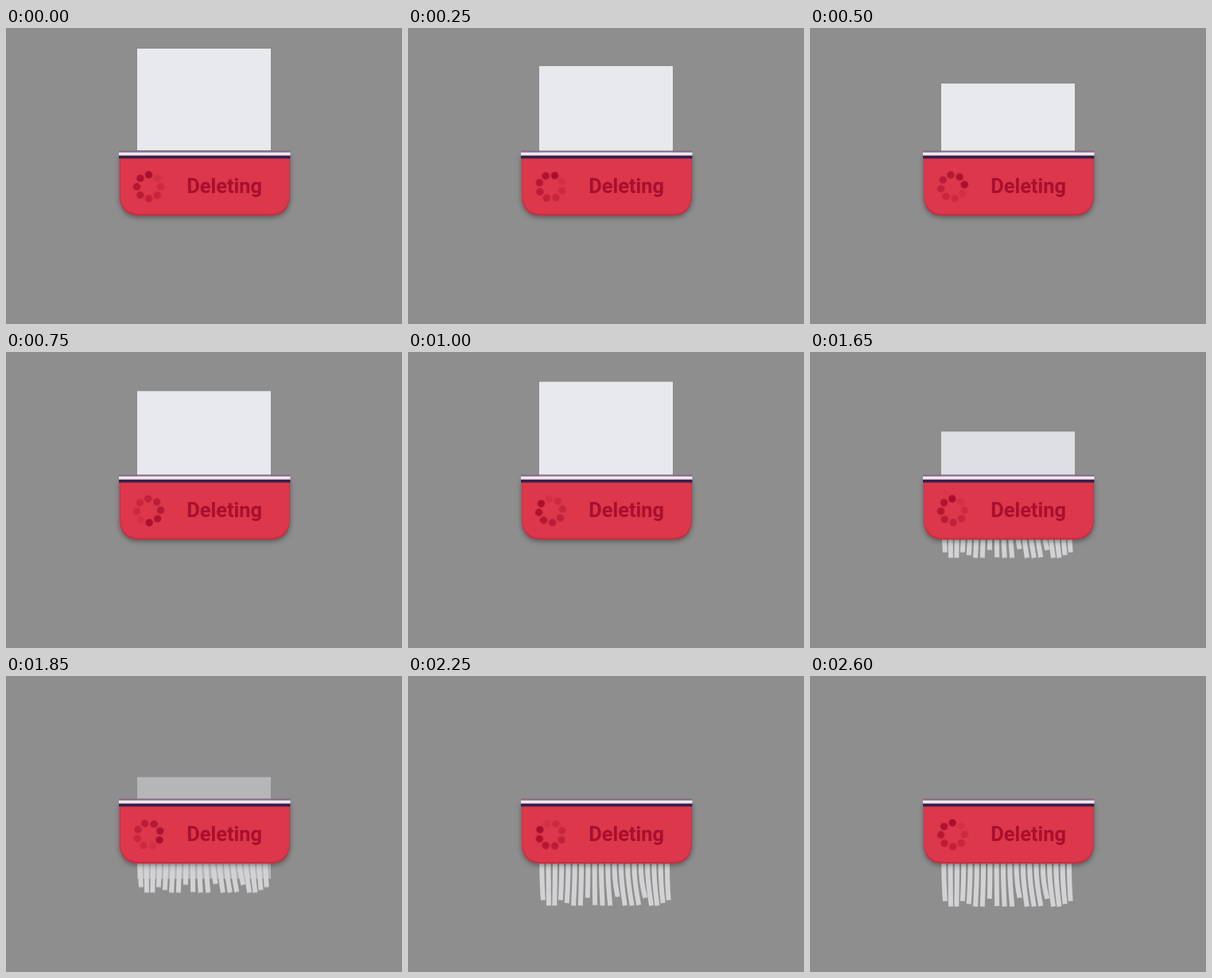
These frames come from a looping animation (498 px wide and 373 px high, 2.65 s). An HTML page:

```html
<!DOCTYPE html>
<html lang="en">
<head>
<meta charset="utf-8">
<title>Deleting</title>
<style>
  html, body { margin: 0; width: 100%; height: 100%; overflow: hidden; background: #8e8e8e; }
  svg { display: block; width: 498px; height: 373px; }
  .body { filter: drop-shadow(0 2px 3px rgba(0, 0, 0, .4)); }
  text { font: 700 25.4px Roboto, sans-serif; fill: #a90f2f; }
</style>
</head>
<body>
<svg viewBox="0 0 498 373">
  <defs>
    <clipPath id="below"><rect x="140" y="205" width="220" height="110"/></clipPath>
  </defs>
  <rect width="498" height="373" fill="#8e8e8e"/>
  <rect id="paper" x="165" y="26" width="168" height="128" fill="#e8e9ed"/>
  <g clip-path="url(#below)">
    <g id="shreds" fill="none" stroke="#d2d2d4" stroke-width="6"></g>
  </g>
  <g class="body">
    <path d="M143 160H357V212Q356 236.5 332 236.5H168Q144 236.5 143 212Z" fill="#cb2c41"/>
    <path d="M143.6 160H356.4V211Q355 234.3 332 234.3H168Q145 234.3 143.6 211Z" fill="#dc374a"/>
  </g>
  <rect x="142" y="154.5" width="215.5" height="2.3" fill="#886c85"/>
  <rect x="142" y="156.8" width="215.5" height="4" fill="#ece7f0"/>
  <rect x="142" y="160.8" width="215.5" height="3.7" fill="#33214a"/>
  <g transform="translate(179.5 200)"><g id="spinner" fill="#ab0e2e"></g></g>
  <text x="227.2" y="207.8">Deleting</text>
</svg>
<script>
  const LOOP = 2650, STEP = 50;
  const STRIPS = 20, DOTS = 8;
  const $ = id => document.getElementById(id);

  function add(parent, tag, attrs) {
    const el = document.createElementNS(parent.namespaceURI, tag);
    for (const key in attrs) el.setAttribute(key, attrs[key]);
    parent.append(el);
  }

  // Evenly spaced strips; lean and length vary in waves
  for (let i = 0; i < STRIPS; i++) {
    const x = 168.3 + i * 8.3;
    const lean = 2 + 3.8 * Math.cos((i - 14) * .33);
    const notch = Math.max(0, Math.cos((i - 3.4) * 2 * Math.PI / 3.8));
    add($("shreds"), "path", { d: `M${x} 190V240q0 20 ${lean} ${50.5 - 11 * notch ** 2}` });
  }

  for (let i = 0; i < DOTS; i++) {
    add($("spinner"), "circle", {
      cy: -15, r: 4.7, opacity: 1.03 - i * .12, transform: `rotate(${-360 / DOTS * i})`
    });
  }

  // Paused animation from [time, value] keys, stepped by draw()
  function track(id, prop, format, easing, ...keys) {
    const frames = keys.map(([time, value]) => ({ offset: time / LOOP, [prop]: format(value), easing }));
    const anim = $(id).animate(frames, { duration: LOOP, fill: "both" });
    anim.pause();
    return anim;
  }

  const down = v => `translateY(${v}px)`;
  const turn = v => `rotate(${v}deg)`;
  const tracks = [
    track("paper", "transform", down, "ease-in-out", [0, 0], [500, 44], [935, 11], [2300, 128], [LOOP, 128]),
    track("paper", "opacity", String, "linear", [0, 1], [1600, 1], [2050, 0], [LOOP, 0]),
    track("shreds", "transform", down, "ease-in-out", [0, -60], [935, -60], [2400, 0], [LOOP, 0]),
    track("spinner", "transform", turn, "cubic-bezier(.4, 0, .65, 1)", [0, 0], [LOOP, 1080])
  ];

  function draw() {
    const t = Math.floor(performance.now() % LOOP / STEP) * STEP;
    for (const anim of tracks) anim.currentTime = t;
    requestAnimationFrame(draw);
  }
  draw();
</script>
</body>
</html>
```
